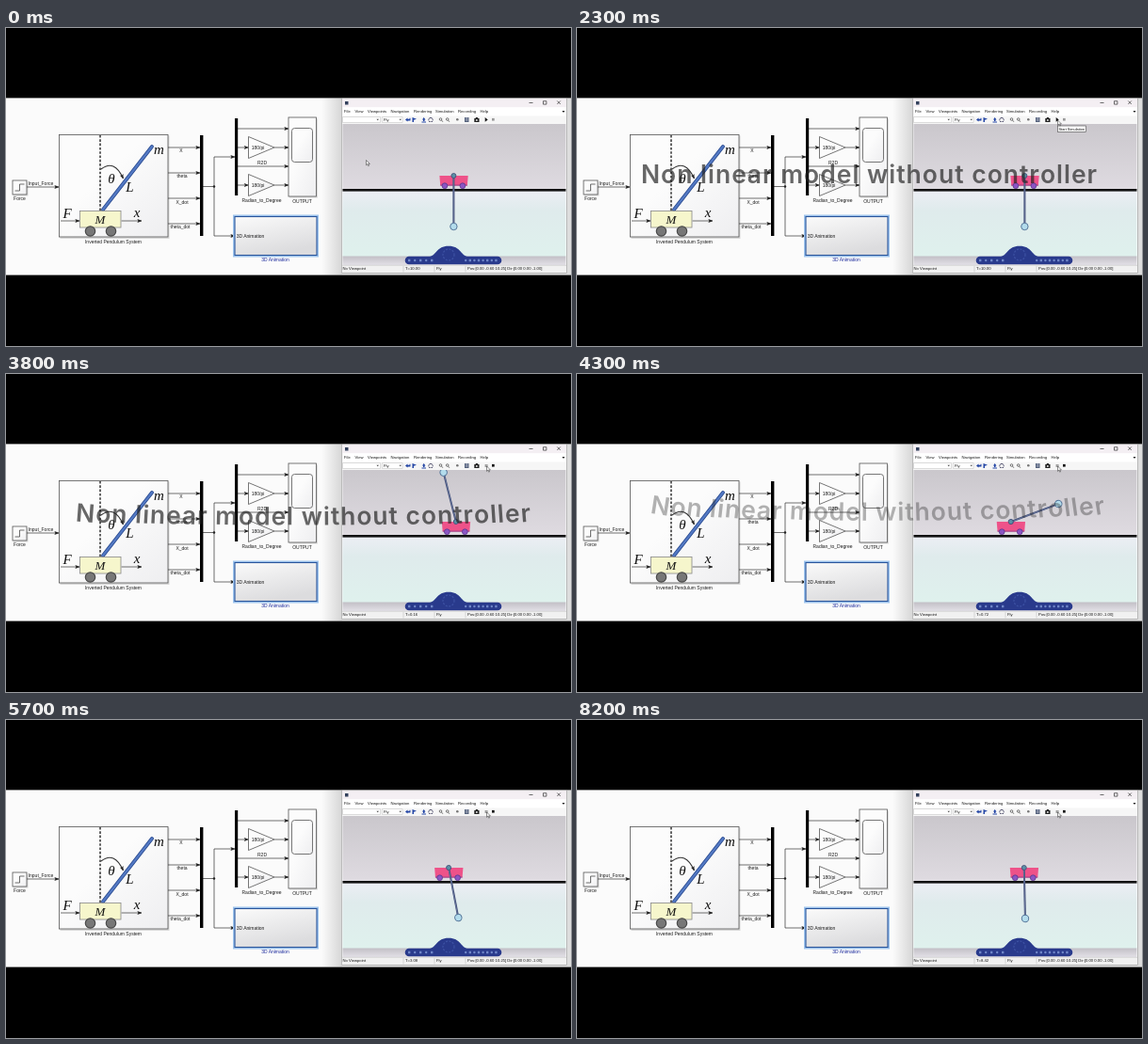
These frames come from a looping animation (600 px wide and 338 px high, 8300 ms). An HTML page:

```html
<!DOCTYPE html>
<html lang="en">
<head>
<meta charset="utf-8">
<title>Inverted pendulum simulation</title>
<style>
html, body { margin: 0; width: 100%; height: 100%; overflow: hidden; background: #000; }
svg { display: block; width: 100vw; height: 100vh; }
text { font-family: "Liberation Sans", Arial, sans-serif; font-size: 5px; fill: #1a1a1a; }
.mid { text-anchor: middle; }
.math text { font-family: "Liberation Serif", "Times New Roman", serif; font-style: italic; font-size: 15px; fill: #111; text-anchor: middle; }
.ui text { font-size: 4.2px; fill: #111; }
.wire { fill: none; stroke: #333; stroke-width: .7; }
.block { fill: url(#face); stroke: #555; stroke-width: .8; }
#title text { font-family: Inter, sans-serif; font-size: 26.5px; font-weight: 600; fill: #222; }
</style>
</head>
<body>
<svg viewBox="0 0 600 338" preserveAspectRatio="none">
  <defs>
    <linearGradient id="face" x2="1" y2="1"><stop offset=".4" stop-color="#fcfcfc"/><stop offset="1" stop-color="#eeeef0"/></linearGradient>
    <linearGradient id="panel" x2=".4" y2="1"><stop stop-color="#fafafa"/><stop offset="1" stop-color="#dcdcde"/></linearGradient>
    <linearGradient id="wall" x2="0" y2="1"><stop stop-color="#cac7cc"/><stop offset="1" stop-color="#dfdbe1"/></linearGradient>
    <linearGradient id="floor" x2="0" y2="1"><stop stop-color="#eceef4"/><stop offset=".3" stop-color="#dfebec"/><stop offset="1" stop-color="#dff1ed"/></linearGradient>
    <linearGradient id="front" x2="0" y2="1"><stop stop-color="#c2bfc6"/><stop offset="1" stop-color="#e4e2e8"/></linearGradient>
    <linearGradient id="shade"><stop stop-color="#000" stop-opacity="0"/><stop offset="1" stop-color="#000" stop-opacity=".15"/></linearGradient>
    <clipPath id="view"><rect x="357.5" y="102" width="237" height="150"/></clipPath>
    <marker id="tip" viewBox="0 0 6 6" refX="5.5" refY="3" markerWidth="5" markerHeight="5" markerUnits="userSpaceOnUse" orient="auto"><path d="M0 .6 6 3 0 5.4 1.2 3z" fill="#222"/></marker>
  </defs>
  <rect width="600" height="338"/>
  <rect y="74.4" width="600" height="188.2" fill="#fbfbfb"/>
  <rect x="335" y="74.4" width="22" height="188.2" fill="url(#shade)"/>
  <path d="M595 74.4h5v188.2H357v-2.600h238z" fill="#000" opacity=".12"/>

  <g id="diagram">
    <g fill="#000" opacity=".13">
      <rect x="57.5" y="114.5" width="116" height="109.5"/>
      <rect x="301" y="96.5" width="30" height="84"/>
      <rect x="8" y="163.5" width="15.5" height="15"/>
    </g>
    <rect class="block" x="7" y="162" width="15" height="15"/>
    <path class="wire" d="M9.5 173h5v-7h5"/>
    <rect class="block" x="56.5" y="113.5" width="115.5" height="108.5"/>
    <g id="wires"></g>
    <path class="wire" d="M209 168.5H221"/>
    <circle cx="221" cy="168.5" r="1.2" fill="#222"/>
    <rect x="206" y="114" width="3.4" height="107"/>
    <rect x="243" y="96" width="3.2" height="82"/>
    <path class="block" d="M257.5 115.5V138.5L285 127zM257.5 155.5V178.5L285 167z"/>
    <rect class="block" x="300" y="95" width="29.5" height="84"/>
    <rect class="block" x="303.5" y="106.5" width="22" height="36" rx="3"/>
    <rect x="242.5" y="200" width="88" height="42" fill="none" stroke="#9fc5ee" stroke-width="3"/>
    <rect x="243" y="200.5" width="87" height="41" fill="url(#panel)" stroke="#2a559b" stroke-width="1.1"/>
  </g>

  <g class="math">
    <path d="M100 114V194" stroke="#111" stroke-width="1.3" stroke-dasharray="2.6 1.7"/>
    <path d="M103 193 155 126" stroke="#294a8f" stroke-width="3.8" stroke-linecap="round"/>
    <path d="M103 193 155 126" stroke="#5379c4" stroke-width="2.2" stroke-linecap="round"/>
    <path d="M101 150Q115 139 124.5 160" class="wire" style="stroke-width:1.1" marker-end="url(#tip)"/>
    <path d="M58 205H78" class="wire" marker-end="url(#tip)"/>
    <path d="M122.5 205H144" class="wire" marker-end="url(#tip)"/>
    <rect x="78.5" y="194.5" width="43.5" height="17.5" fill="#f6f6cc" stroke="#888" stroke-width=".8"/>
    <g fill="#777" stroke="#4a4a4a" stroke-width="1.2"><circle cx="89.5" cy="216" r="5.2"/><circle cx="111.5" cy="216" r="5.2"/></g>
    <text x="112" y="165">θ</text><text x="131.5" y="174">L</text><text x="162.5" y="134">m</text>
    <text x="65" y="202">F</text><text x="139" y="201">x</text><text x="100" y="207.5" style="font-size:13px">M</text>
  </g>
  <g id="labels"></g>

  <g class="ui">
    <rect x="356.8" y="75" width="238.5" height="185.3" fill="#fff" stroke="#999" stroke-width=".6"/>
    <rect x="357" y="75.2" width="238" height="9" fill="#f4eff3"/>
    <rect x="360" y="78" width="3.5" height="3.5" fill="#33415c"/>
    <path class="wire" d="M555.5 79.5h4M570.5 77.7h3.4v3.4h-3.4zM585.3 77.5l3.5 3.5m0-3.5l-3.5 3.5"/>
    <path d="M590.5 88h3l-1.5 2z" fill="#222"/>
    <rect x="357" y="93.5" width="238" height="8.5" fill="#f6f6f6"/>
    <path d="M357.5 94.5h40v6h-40zM399.5 94.5h21.5v6h-21.5z" fill="#fff" stroke="#bbb" stroke-width=".5"/>
    <path d="M393.5 96.7h2.5l-1.25 1.6zM417.5 96.7h2.5l-1.25 1.6z" fill="#444"/>
    <g id="tools" fill="#2345a5">
      <path d="M424 97.5l2.5-2v1.2h2v-1h1v2.8h-3v1zM431.5 95l4.500 1.7-3 1v2.3h-1.5z"/>
      <path d="M441.5 99.5h4.5v1h-4.5zM442 97.5l1.7-2.5 1.8 2.5h-1v1.5h-1.500v-1.5z"/>
      <path d="M449 98.500a2.200 2.200 0 1 1 4 0M449 99.5h1.600M451.400 99.5h1.600" fill="none" stroke="#335" stroke-width=".8"/>
      <g fill="none" stroke="#444" stroke-width=".7"><circle cx="461.5" cy="97" r="1.3"/><path d="M462.5 98l1.4 1.8M469.5 98l1.4 1.8"/><circle cx="468.7" cy="97" r="1.3"/></g>
      <circle cx="479.3" cy="97.3" r="1.3" fill="#777"/>
      <path d="M487 95h4.5v5h-4.5z" fill="#55627c"/><path d="M488 96h2.5M488 98h2.5" stroke="#dde" stroke-width=".7"/>
      <path d="M497.3 96h1.2l.6-1h1.6l.6 1h1.2v4h-5.2z" fill="#222"/><circle cx="499.9" cy="98" r="1" fill="#ddd"/>
    </g>
    <path id="play" d="M508.7 95l3 2.4-3 2.4z" fill="#111"/>
    <path id="pause" d="M508.7 96h1v3h-1zm1.7 0h1v3h-1z" fill="#777"/>
    <rect id="stop" x="516" y="95.9" width="2.7" height="2.7"/>

    <g clip-path="url(#view)">
      <rect x="357" y="102" width="238" height="70" fill="url(#wall)"/>
      <rect x="357" y="173" width="238" height="70" fill="url(#floor)"/>
      <rect x="357" y="242.5" width="238" height="10" fill="url(#front)"/>
      <rect x="357" y="171" width="238" height="2.6" fill="#111"/>
      <g id="cart">
        <path d="M-15 0H15.3L14.500 10H-14.2z" fill="#ee5289"/>
        <path d="M-14.2 9.5h28.7v1.2h-28.7z" fill="#a84088"/>
        <g fill="#8b55c4" stroke="#5a3689" stroke-width=".8"><circle cx="-9.5" cy="10.7" r="2.9"/><circle cx="9.5" cy="10.7" r="2.9"/></g>
        <g id="pole" stroke="#46527a">
          <path d="M0 0V54" stroke-width="2"/><path d="M-.2 3V50" stroke="#7483aa" stroke-width=".6"/>
          <circle r="2.5" fill="#5b90a6" stroke-width=".9"/>
          <circle cy="54" r="3.7" fill="#b3dcec" stroke="#56769a" stroke-width="1"/>
        </g>
      </g>
      <path d="M428 242.7H450C457 242 457 231.8 470 231.8S483 242 490 242.7H522A4.2 4.2 0 0 1 522 251.3H428A4.2 4.2 0 0 1 428 242.7z" fill="#293a8c"/>
      <circle cx="470" cy="241" r="6" fill="none" stroke="#3d52a4" stroke-width="1.2" stroke-dasharray="2 1.5"/>
      <g id="dots" fill="#6f86c8"></g>
    </g>
    <rect x="357" y="252" width="238" height="8" fill="#f1f1f1"/>
    <path d="M357 252.3H595M422 253v6.5M455 253v6.5M488 253v6.5" stroke="#bbb" stroke-width=".5"/>
    <text id="clock" x="424" y="257.3"></text>
    <g id="hint">
      <rect x="510.5" y="104" width="30" height="6.5" fill="#fff" stroke="#444" stroke-width=".6"/>
      <text x="511.5" y="108.8" style="font-size:3.9px">Start Simulation</text>
    </g>
  </g>
  <g id="title"></g>
  <path id="cursor" d="M0 0V5.3L1.3 4.2 2.2 6.2 3 5.8 2.1 3.9H3.9z" fill="#fff" stroke="#222" stroke-width=".5"/>
</svg>
<script>
const LOOP = 8300, STEP = 100;
const $ = id => document.getElementById(id);
const clamp = v => Math.max(0, Math.min(1, v));
const ease = p => (1 - Math.cos(Math.PI * clamp(p))) / 2;

function add(parent, tag, attrs, content) {
  const el = document.createElementNS("http://www.w3.org/2000/svg", tag);
  for (const k in attrs) el.setAttribute(k, attrs[k]);
  if (content) el.textContent = content;
  return parent.appendChild(el);
}

// Signal lines
["M22 169H56", "M172 127H206", "M172 154H206", "M172 181H206", "M172 208H206",
 "M221 168.5V137H243", "M221 168.5V221H243", "M246 107H300", "M246 127H257.5",
 "M285 127H300", "M246 147H300", "M246 167H257.5", "M285 167H300"]
  .forEach(d => add($("wires"), "path", { d, class: "wire", "marker-end": "url(#tip)" }));

// Diagram labels
[["Force", 14.5, 183], ["Input_Force", 37, 167], ["Inverted Pendulum System", 114, 228.5],
 ["X", 186, 132], ["theta", 187, 159], ["X_dot", 187, 186.5], ["theta_dot", 185, 213],
 ["180/pi", 267.5, 129], ["180/pi", 267.5, 169], ["R2D", 272, 145], ["Radian_to_Degree", 271.5, 184.5],
 ["OUTPUT", 314.5, 185.5], ["3D Animation", 259.5, 223]]
  .forEach(([s, x, y]) => add($("labels"), "text", { x, y, class: "mid" }, s));
add($("labels"), "text", { x: 286, y: 247.5, class: "mid", style: "fill:#1c2a9c" }, "3D Animation");

// Window labels
const ui = document.querySelector(".ui");
[["File", 359], ["View", 370.5], ["Viewpoints", 384], ["Navigation", 408.5], ["Rendering", 433],
 ["Simulation", 456], ["Recording", 480], ["Help", 503.5]]
  .forEach(([s, x]) => add(ui, "text", { x, y: 90.2 }, s));
add(ui, "text", { x: 401, y: 99 }, "Fly");
[["No Viewpoint", 357.5], ["Fly", 457], ["Pos:[0.00 -0.60 10.25] Dir:[0.00 0.00 -1.00]", 490]]
  .forEach(([s, x]) => add(ui, "text", { x, y: 257.3 }, s));
for (let i = 0; i < 13; i++) {
  const x = i < 5 ? 427 + i * 6 : 487 + (i - 5) * 4.6;
  add($("dots"), "rect", { x, y: 245.8, width: 2.4, height: 2.4, rx: i % 2 ? 1.2 : .3 });
}

// Title letters, placed by their natural advance
const pen = document.createElement("canvas").getContext("2d");
pen.font = "600 26.5px Inter, sans-serif";
let width = 0;
const letters = [..."Non linear model without controller"].map(ch => {
  const w = pen.measureText(ch).width;
  const letter = { x: width + w / 2, el: add($("title"), "text", { class: "mid" }, ch) };
  width += w + 1;
  return letter;
});

function drawTitle(t) {
  const alpha = Math.min(clamp((t - 600) / 500), 1 - clamp((t - 4000) / 600));
  $("title").setAttribute("opacity", alpha * .68);
  if (!alpha) return;
  const a = clamp(1 - (t - 600) / 1400), b = clamp((t - 3300) / 1300);
  const centre = 310.5 + (t - 2300) / 300 - 32 * a * a + 4.4 * b * b;
  letters.forEach(({ x, el }, i) => {
    const u = 2 * x / width - 1;
    const y = 165 + a * (13 + 4 * Math.sin(u * 4)) - b * (12 + 9 * u * u);
    const turn = 16 * a * Math.sin(i * 1.3) - 12 * u * b;
    el.setAttribute("opacity", clamp(1 - 1.5 * a * (1 - u * u)));
    el.setAttribute("transform",
      `translate(${centre + x - width / 2} ${y}) rotate(${turn}) skewX(${-22 * a})`);
  });
}

// Pole angle from hanging, in degrees: upright, fall, then decaying swing
function poleAngle(s) {
  if (s < 3.5) return 0;
  if (s < 4.35) return -180 + 295 * ease((s - 3.71) / .64);
  if (s < 4.9) return 115 - 169 * ease((s - 4.35) / .55);
  const d = s - 4.9;
  return -54 * Math.exp(-1.135 * d) * Math.cos(2 * Math.PI * d / .6);
}

const clockKeys = [[3.7, 0], [3.8, .16], [4.8, 1.28], [6.7, 5.08], [8.2, 8.42], [8.3, 8.64]];
function simTime(s) {
  if (s < 3.5) return 10;
  if (s <= 3.7) return 0;
  const i = clockKeys.findIndex(k => s <= k[0]);
  const [s0, v0] = clockKeys[i - 1], [s1, v1] = clockKeys[i];
  return v0 + (v1 - v0) * (s - s0) / (s1 - s0);
}

function draw(t) {
  const s = t / 1000, running = s >= 3.5;
  const deg = poleAngle(s), rad = deg * Math.PI / 180;
  const x = 475.4 - 54 * Math.sin(rad) * (.35 + .17 * Math.cos(rad));
  $("cart").setAttribute("transform", `translate(${x} 157)`);
  $("pole").setAttribute("transform", `rotate(${-deg})`);
  $("clock").textContent = "T=" + simTime(s).toFixed(2);
  $("play").style.display = running ? "none" : "";
  $("pause").style.display = running ? "" : "none";
  $("stop").setAttribute("fill", running ? "#111" : "#999");
  $("hint").style.display = s >= 1.9 && s < 2.9 ? "" : "none";
  const m = ease((s - .3) / .9);
  $("cursor").setAttribute("transform", `translate(${382.5 + 128 * m} ${140.5 - 42.5 * m})`);
  drawTitle(t);
}

function tick() {
  draw(Math.floor(performance.now() % LOOP / STEP) * STEP);
  requestAnimationFrame(tick);
}
tick();
</script>
</body>
</html>
```
